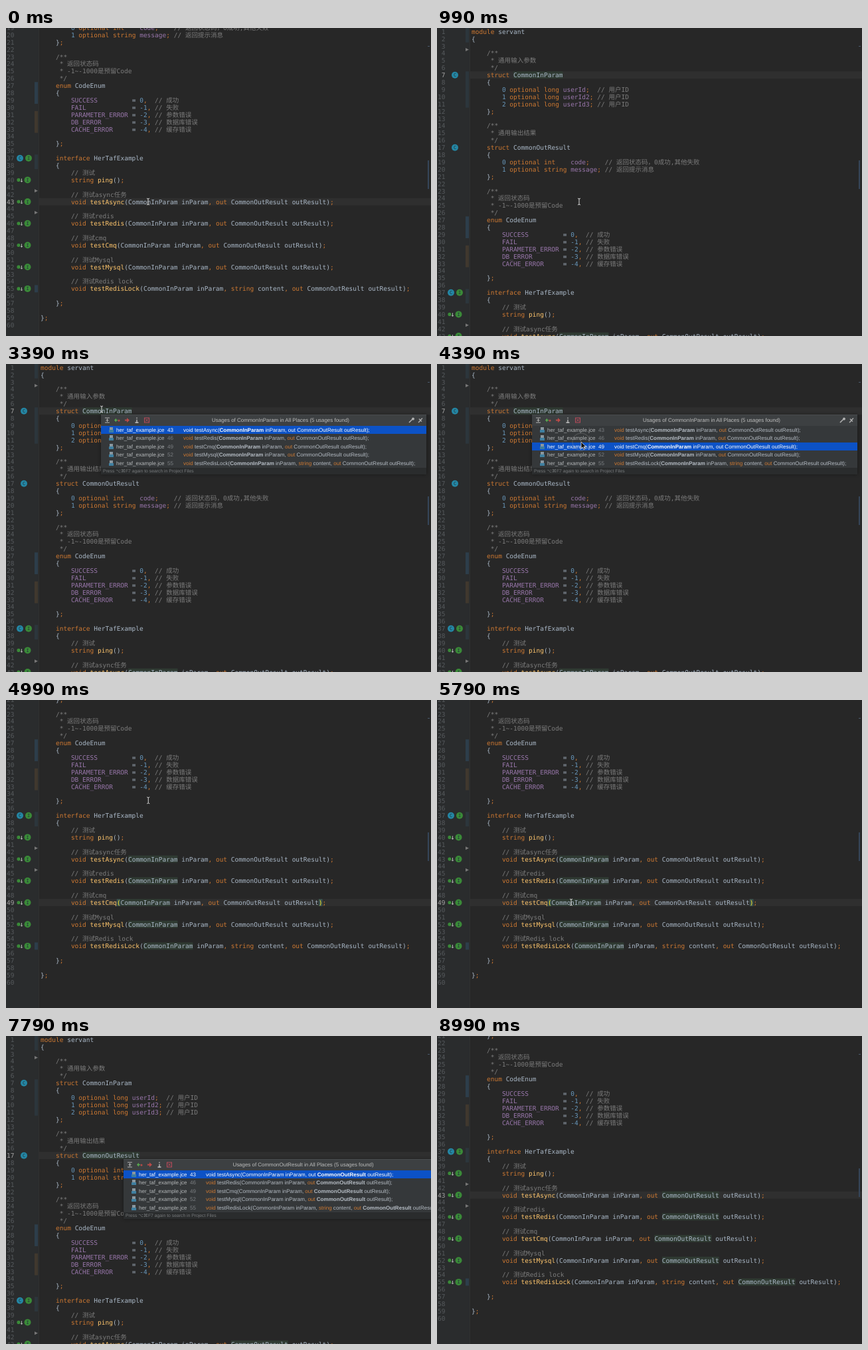
These frames come from a looping animation (640 px wide and 463 px high, 9.19 s). An HTML page with a canvas:

```html
<!DOCTYPE html>
<html lang="zh">
<head>
<meta charset="utf-8">
<title>Find usages</title>
<style>
html, body { margin: 0; width: 100%; height: 100%; overflow: hidden; background: #272727; }
canvas { display: block; }
</style>
</head>
<body>
<canvas id="stage" width="640" height="463"></canvas>
<script>
const ctx = document.getElementById('stage').getContext('2d');
const W = 640, H = 463, LOOP = 9190, FIRST = 190, STEP = 200;
const LEFT = 52, CH = 5.737, PITCH = 10.9, TOP = 5.3;
const MONO = '9.53px "DejaVu Sans Mono", "Noto Sans CJK SC", "Noto Sans CJK", monospace';
const UI = '8.05px "Liberation Sans", sans-serif';
const UI_BOLD = 'bold ' + UI;
const C = {
  plain: '#a9b7c6', key: '#cc7832', num: '#6897bb', field: '#9876aa',
  call: '#ffc66d', note: '#7c7c7c', match: '#ffef28'
};

const method = (name, extra = '') =>
  `void ${name}(CommonInParam inParam, ${extra}out CommonOutResult outResult);`;
const methods = [
  [43, method('testAsync')], [46, method('testRedis')], [49, method('testCmq')],
  [52, method('testMysql')], [55, method('testRedisLock', 'string content, ')]
];

const code = `module servant
{

    /**
     * 通用输入参数
     */
    struct CommonInParam
    {
        0 optional long userId;  // 用户ID
        1 optional long userId2; // 用户ID
        2 optional long userId3; // 用户ID
    };

    /**
     * 通用输出结果
     */
    struct CommonOutResult
    {
        0 optional int    code;    // 返回状态码，0成功,其他失败
        1 optional string message; // 返回提示消息
    };

    /**
     * 返回状态码
     * -1~-1000是预留Code
     */
    enum CodeEnum
    {
        SUCCESS         = 0,  // 成功
        FAIL            = -1, // 失败
        PARAMETER_ERROR = -2, // 参数错误
        DB_ERROR        = -3, // 数据库错误
        CACHE_ERROR     = -4, // 缓存错误

    };

    interface HerTafExample
    {
        // 测试
        string ping();

        // 测试async任务
        ${methods[0][1]}

        // 测试redis
        ${methods[1][1]}

        // 测试cmq
        ${methods[2][1]}

        // 测试Mysql
        ${methods[3][1]}

        // 测试Redis lock
        ${methods[4][1]}

    };

};
`.split('\n');

const KEYWORD = /^(module|struct|enum|interface|optional|long|int|string|void|out|[;,])$/;

function colorOf(text, next) {
  if (/^(\/\/|\/\*| +\*)/.test(text)) return C.note;
  if (KEYWORD.test(text)) return C.key;
  if (/^-?\d/.test(text)) return C.num;
  if (/^([A-Z_]{3,}|userId\d?|code|message)$/.test(text)) return C.field;
  return next === '(' && /\w/.test(text) ? C.call : C.plain;
}

const lines = code.map(s =>
  [...s.matchAll(/\/\/.*|\/\*\*|^ +\*.*|-?\b\d+\b|\w+|[^\s\w]/g)].map(m => ({
    col: m.index, text: m[0], color: colorOf(m[0], s[m.index + m[0].length])
  })));

// Each scene holds from its step until the next one.
const scenes = [
  { from: 0, scroll: 202, line: 43 },
  { from: 5, scroll: 0, line: 7, mark: 'CommonInParam' },
  { from: 14, scroll: 0, line: 7, mark: 'CommonInParam', popup: [144, 76], pick: 0 },
  { from: 21, scroll: 0, line: 7, mark: 'CommonInParam', popup: [144, 76], pick: 2 },
  { from: 24, scroll: 224, line: 49, mark: 'CommonInParam', parens: true },
  { from: 32, scroll: 0, line: 17, mark: 'CommonOutResult' },
  { from: 37, scroll: 0, line: 17, mark: 'CommonOutResult', popup: [178, 185], pick: 0 },
  { from: 43, scroll: 224, line: 43, mark: 'CommonOutResult' }
];

// Mouse path: ms, x, y
const path = [
  [0, 214, 261], [1000, 214, 261], [1700, 161, 68], [2300, 161, 68], [2700, 144, 68],
  [3600, 144, 68], [4100, 217, 117], [4800, 217, 117], [5500, 202, 304], [5900, 202, 304],
  [6300, 365, 305], [6600, 365, 305], [7100, 178, 177], [7500, 178, 177]
];
// Click rings: step, radius
const rings = { 3: 17, 4: 14, 10: 17, 11: 14, 21: 17, 22: 13, 31: 17, 36: 17 };

function mouseAt(ms) {
  const i = path.findIndex(p => p[0] > ms);
  if (i < 1) return null;
  const [a, b] = [path[i - 1], path[i]];
  const u = (ms - a[0]) / (b[0] - a[0]), e = u * u * (3 - 2 * u);
  return [a[1] + (b[1] - a[1]) * e, a[2] + (b[2] - a[2]) * e];
}

function box(x, y, w, h, color) {
  ctx.fillStyle = color;
  ctx.fillRect(x, y, w, h);
}

function disc(x, y, r, color) {
  ctx.fillStyle = color;
  ctx.beginPath();
  ctx.arc(x, y, r, 0, 7);
  ctx.fill();
}

function poly(points, color) {
  ctx.fillStyle = color;
  ctx.beginPath();
  points.forEach(([x, y]) => ctx.lineTo(x, y));
  ctx.fill();
}

function stroke(points, color, width = 1) {
  ctx.strokeStyle = color;
  ctx.lineWidth = width;
  ctx.beginPath();
  for (const [x1, y1, x2, y2] of points) {
    ctx.moveTo(x1, y1);
    ctx.lineTo(x2, y2);
  }
  ctx.stroke();
}

function write(text, x, y, color, font = MONO, align = 'left') {
  ctx.font = font;
  ctx.textAlign = align;
  ctx.fillStyle = color;
  ctx.fillText(text, x, y);
  return ctx.measureText(text).width;
}

function badge(x, y, letter, color) {
  disc(x, y, 5, color);
  write(letter, x, y + 2.5, '#24343a', '7px "DejaVu Sans Mono", monospace', 'center');
}

function gutter(scene, yOf) {
  box(0, 0, 49, H, '#2a2c2d');
  box(49, 0, 1, H, '#303131');
  const bars = [[1, 2, '#2c363c'], [7, 11, '#2c363c'], [27, 29, '#2d3e4b'],
    [31, 33, '#40382e'], [37, 38, '#2c363c'], [55, 55, '#2d3e4b']];
  for (const [a, b, color] of bars)
    box(43, yOf(a) - PITCH / 2, 5, (b - a + 1) * PITCH, color);
  for (let n = 1; n <= 60; n++)
    write(n, 12.5, yOf(n) + 3.4, n === scene.line ? '#a4a3a3' : '#565a5d', MONO, 'right');
  for (const n of [7, 17]) badge(27, yOf(n), 'C', '#2487a5');
  badge(21, yOf(37), 'C', '#2487a5');
  badge(34, yOf(37), 'I', '#3a8a38');
  for (const n of [40, ...methods.map(m => m[0])]) {
    const y = yOf(n);
    disc(19, y, 2.6, '#3a8a38');
    stroke([[23.5, y - 2, 23.5, y + 3], [22, y + 1.5, 23.5, y + 3], [25, y + 1.5, 23.5, y + 3]], '#b5b8b5');
    badge(32.5, y, 'I', '#3a8a38');
  }
  for (const n of [3.5, 41.5, 44.5]) {
    const y = yOf(n);
    poly([[43, y - 2.5], [48, y], [43, y + 2.5]], '#777');
  }
}

function editor(scene) {
  const yOf = n => TOP + (n - 1) * PITCH - scene.scroll;
  box(0, 0, W, H, '#272727');
  gutter(scene, yOf);
  box(50, yOf(scene.line) - PITCH / 2, W - 50, PITCH, '#2f2f2f');
  lines.forEach((tokens, i) => {
    const y = yOf(i + 1);
    if (y < -8 || y > H + 8) return;
    for (const { col, text, color } of tokens) {
      const x = LEFT + col * CH;
      const paren = scene.parens && i + 1 === scene.line && /[()]/.test(text);
      if (text === scene.mark || paren)
        box(x, y - PITCH / 2, text.length * CH, PITCH, paren ? '#3b514d' : '#2f3a32');
      write(text, x, y + 3.4, paren ? C.match : color);
    }
  });
  box(635, 27, 3, 1, '#4a5a6c');
  box(635, 199, 2, 43, '#35465a');
}

function toolbar() {
  stroke([[5, 5, 12, 5], [5, 12, 12, 12], [8.5, 6, 8.5, 11], [6.5, 8.5, 10.5, 8.5]], '#b0b0b0');
  stroke([[20, 8.5, 24, 8.5]], '#59a84f', 1.5);
  poly([[19, 8.5], [22, 5.5], [22, 11.5]], '#59a84f');
  disc(26, 9, 1.5, '#b84a48');
  poly([[42, 8.5], [38, 5], [38, 12]], '#b84a48');
  box(35, 7.5, 3, 2, '#b84a48');
  stroke([[53, 4.5, 53, 6], [53, 7.5, 53, 12], [50.5, 12, 55.5, 12]], '#c4c4c4', 1.3);
  stroke([[64, 5, 72, 5], [64, 12, 72, 12], [64.5, 5, 64.5, 12], [71.5, 5, 71.5, 12],
    [66, 6.5, 70, 10.5], [70, 6.5, 66, 10.5]], '#b84a5a');
  stroke([[463, 12, 468, 7]], '#b0b0b0', 1.6);
  disc(469, 6.5, 2, '#b0b0b0');
  stroke([[477, 12, 480, 9], [478, 6.5, 482, 10.5], [480, 8.5, 483, 5.5]], '#b0b0b0', 1.4);
}

function popup({ popup: [x, y], pick, mark }) {
  ctx.save();
  ctx.translate(x, y);
  ctx.shadowColor = 'rgba(0,0,0,.4)';
  ctx.shadowBlur = 5;
  box(-1, 0, 490, 90, '#35383a');
  ctx.shadowColor = 'transparent';
  box(-1, 0, 490, 17, '#3d4042');
  box(-1, 0, 490, 1, '#4a4d4f');
  toolbar();
  write(`Usages of ${mark} in All Places (5 usages found)`, 269.5, 11, '#bdbdbd',
    '7.95px "Liberation Sans", sans-serif', 'center');
  methods.forEach(([n, text], i) => {
    const top = Math.round(16.6 + i * 12.55), base = top + 9, on = i === pick;
    if (on) box(-1, top, 490, 12, '#0c52c6');
    box(12, top + 2, 5, 8, '#8a979f');
    box(11, top + 6, 7, 4, '#3f7fa0');
    write('her_taf_example.jce', 22, base, on ? '#fff' : '#b5b8ba', UI);
    write(n, 99, base, on ? '#fff' : '#7b7f82', UI);
    let left = 123;
    for (const part of text.split(/\b(void|out|string|CommonInParam|CommonOutResult)\b/)) {
      const color = on ? '#fff' : KEYWORD.test(part) ? C.key : '#b5bcc4';
      left += write(part, left, base, color, part === mark ? UI_BOLD : UI);
    }
  });
  box(-1, 80, 490, 10, '#2a2c2d');
  write('Press ⌥⌘F7 again to search in Project Files', 2, 87, '#777a7c',
    '6.8px "Liberation Sans", "DejaVu Sans", sans-serif');
  ctx.restore();
}

function pointer([x, y], ring, arrow) {
  if (ring) {
    ctx.strokeStyle = ring > 15 ? 'rgba(170,170,170,.75)' : 'rgba(150,150,150,.25)';
    ctx.lineWidth = 1.3;
    ctx.beginPath();
    ctx.arc(x, y, ring, 0, 7);
    ctx.stroke();
  }
  if (arrow) {
    const shape = [[0, 0], [0, 10], [2.4, 8], [4, 11.5], [5.5, 10.8], [4, 7.4], [7, 7.2]]
      .map(([a, b]) => [x + a, y + b]);
    poly(shape, '#111');
    ctx.closePath();
    ctx.strokeStyle = '#ddd';
    ctx.lineWidth = 0.8;
    ctx.stroke();
  } else {
    stroke([[x, y - 4, x, y + 4], [x - 2, y - 5, x, y - 4], [x + 2, y - 5, x, y - 4],
      [x - 2, y + 5, x, y + 4], [x + 2, y + 5, x, y + 4]], '#d8d8d8');
  }
}

let shown = -1;
function frame(now) {
  const t = now % LOOP;
  const step = t < FIRST ? 0 : Math.floor((t - FIRST) / STEP) + 1;
  if (step !== shown) {
    shown = step;
    const scene = scenes.filter(s => s.from <= step).pop();
    ctx.textRendering = 'geometricPrecision';
    editor(scene);
    if (scene.popup) popup(scene);
    const mouse = mouseAt(step ? FIRST + (step - 1) * STEP : 0);
    if (mouse) pointer(mouse, rings[step], scene.popup && mouse[1] > scene.popup[1]);
  }
  requestAnimationFrame(() => frame(performance.now() - start));
}
const start = performance.now();
frame(0);
</script>
</body>
</html>
```
